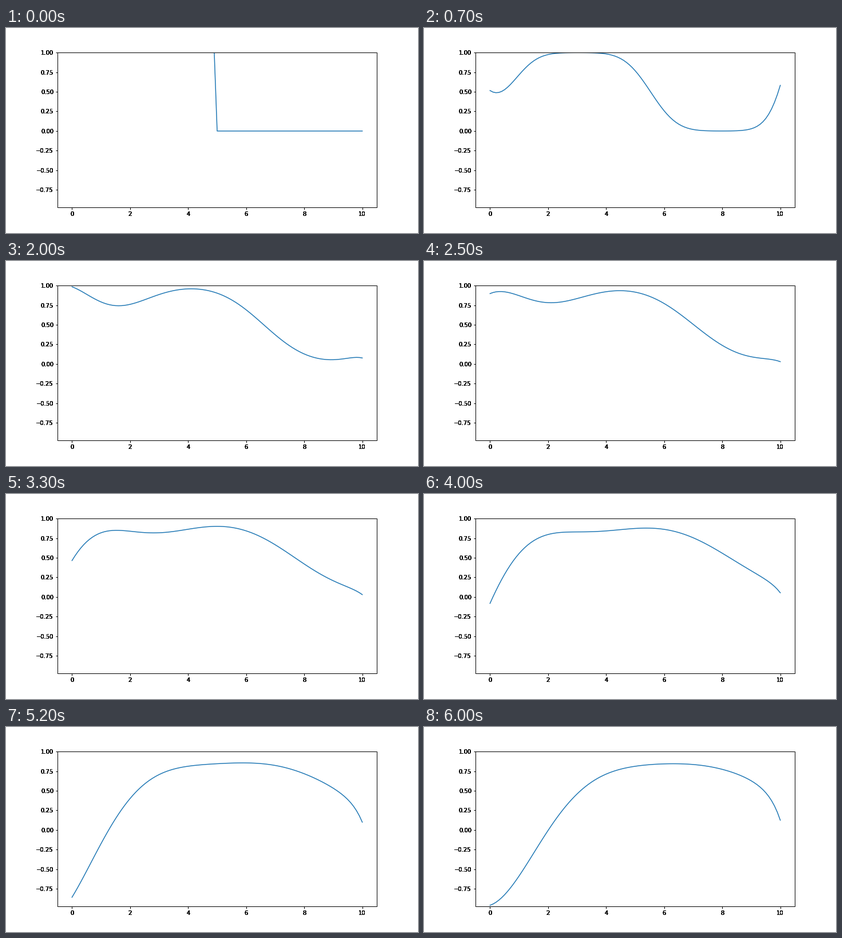
These frames come from a looping animation (720 px wide and 360 px high, 6100 ms). A matplotlib script:

```python
import numpy as np
import matplotlib.pyplot as plt
from matplotlib.animation import FuncAnimation

FRAMES = 61
INTERVAL = 100      # ms
SUBSTEPS = 10
DT = 0.00827
SPEED = 1.0
DIFFUSION = 0.45
LABEL_LAYERS = 7    # stacked copies give the labels hard, heavy edges


def left_value(t):
    return np.sin(t)


def right_value(t):
    return np.exp(-t * t)


def solve(x):
    """Advect and diffuse a step between two driven ends, one row per frame."""
    dx = x[1] - x[0]
    u = np.where(np.arange(x.size) < x.size // 2, 1.0, 0.0)
    rows = [u]
    t = 0.0
    for _ in range(FRAMES - 1):
        for _ in range(SUBSTEPS):
            padded = np.concatenate(([left_value(t)], u, [right_value(t)]))
            before, after = padded[:-2], padded[2:]
            drift = -SPEED * (after - before) / (2 * dx)
            spread = DIFFUSION * (after - 2 * u + before) / dx**2
            u = u + DT * (drift + spread)
            t += DT
        rows.append(u)
    return np.array(rows)


def draw_labels(ax, xticks, yticks):
    x_trans, x_va, x_ha = ax.get_xaxis_text1_transform(7)
    y_trans, y_va, y_ha = ax.get_yaxis_text1_transform(7)
    for _ in range(LABEL_LAYERS):
        for v in xticks:
            ax.text(v, 0, f"{v}", transform=x_trans, va=x_va, ha=x_ha)
        for v in yticks:
            text = f"{v:.2f}".replace("-", "\u2212")
            ax.text(0, v, text, transform=y_trans, va=y_va, ha=y_ha)


plt.rcParams.update({"font.family": "DejaVu Sans", "font.size": 10,
                     "axes.linewidth": 1.0})

x = np.linspace(0, 10, 101)
states = solve(x)

fig, ax = plt.subplots(figsize=(10, 5), dpi=72)
fig.subplots_adjust(left=0.125, right=0.9, bottom=0.125, top=0.88)
line, = ax.plot(x, states[0], color="#1f77b4", lw=1.5)

xticks = range(0, 11, 2)
yticks = np.arange(-3, 5) / 4
ax.set_xticks(xticks)
ax.set_yticks(yticks)
ax.set_xlim(-0.5, 10.5)
ax.set_ylim(states.min(), states.max())
ax.tick_params(width=1.0, labelleft=False, labelbottom=False)
draw_labels(ax, xticks, yticks)


def update(i):
    line.set_ydata(states[i])
    return line,


anim = FuncAnimation(fig, update, frames=FRAMES, interval=INTERVAL,
                     repeat=True, repeat_delay=0)
plt.show()
```
